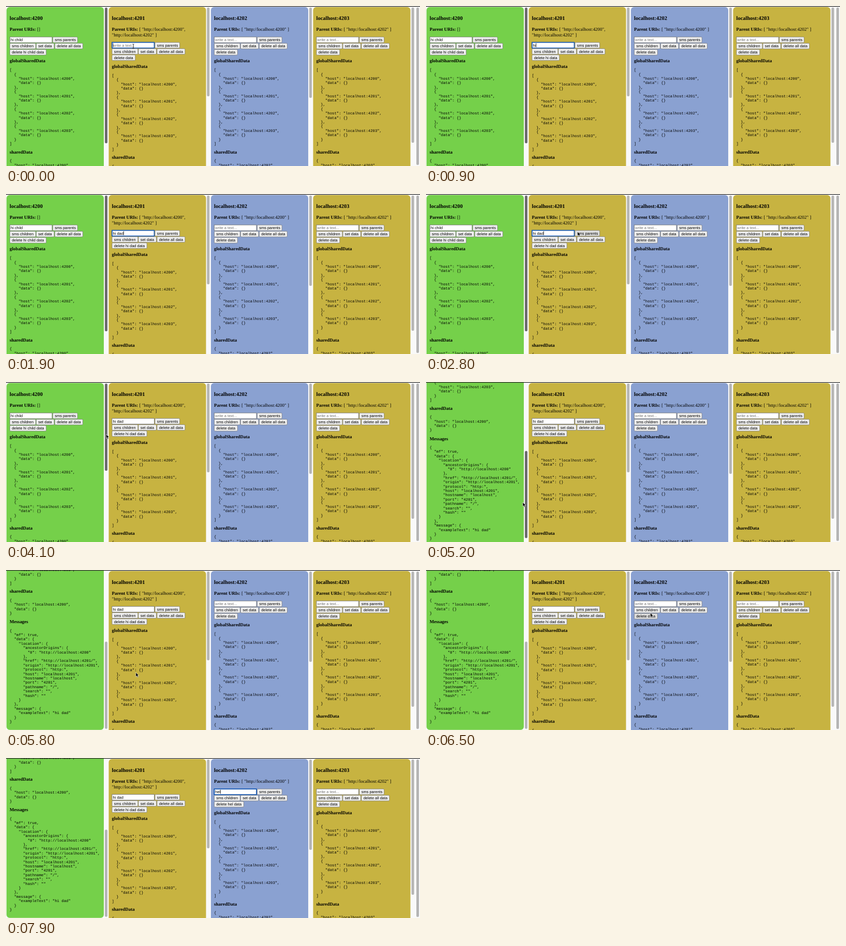
An HTML page that plays this animation: 800x310 px, repeating every 8 s.

```html
<!DOCTYPE html>
<html lang="en">
<head>
<meta charset="utf-8">
<title>Shared data between frames</title>
<style>
  html, body { margin: 0; width: 100%; height: 100%; overflow: hidden; background: #f9f9f9; }
  svg { display: block; }
  text { white-space: pre; text-rendering: geometricPrecision; }
  .title, .bold, .serif { font-family: "Liberation Serif", Times, serif; font-size: 8.96px; }
  .title { font-size: 10.48px; }
  .title, .bold { font-weight: bold; }
  .code { font-family: "Liberation Mono", Courier, monospace; font-size: 7.28px; }
  .ui { font-family: "Liberation Sans", Arial, sans-serif; font-size: 7.47px; }
  .button { fill: #efefef; stroke: #707070; stroke-width: .7px; }
  .button.hover { fill: #dedede; }
  .field { fill: #fff; stroke: #767676; stroke-width: .9px; }
  .field.focus { stroke: #1257b5; stroke-width: 1.7px; }
  .empty { fill: #757575; }
</style>
</head>
<body>
<svg id="stage" width="800" height="310" viewBox="0 0 800 310"></svg>
<script>
const LOOP = 8000, STEP = 100;
const LINE = 8.4, CHAR = 4.368;
const stage = document.getElementById('stage');

function add(parent, tag, attrs, content) {
  const node = document.createElementNS('http://www.w3.org/2000/svg', tag);
  for (const key in attrs) node.setAttribute(key, attrs[key]);
  if (content !== undefined) node.textContent = content;
  return parent.appendChild(node);
}

const label = (parent, cls, x, y, content) => add(parent, 'text', { class: cls, x, y }, content);

function json(parent, x, y, value) {
  JSON.stringify(value, null, 2).split('\n').forEach((line, i) => {
    const body = line.trimStart();
    label(parent, 'code', x + (line.length - body.length) * CHAR, y + i * LINE, body);
  });
}

function button(parent, x, y, width, content) {
  const box = add(parent, 'rect', { class: 'button', x: x + .4, y: y + .4, width, height: 10.8, rx: 1.6 });
  const text = label(parent, 'ui', x + 4.2, y + 8.5, content);
  return { box, text };
}

const hosts = ['4200', '4201', '4202', '4203'].map(port => 'localhost:' + port);

function panel(index, color, height, uris, shift) {
  const x = 1 + 197.5 * index, left = x + 6;
  const g = add(stage, 'g', {});
  add(g, 'rect', { x, y: 2, width: 188, height, rx: 6, fill: color });
  label(g, 'title', left, 26.8, hosts[index]);
  const line = label(g, 'serif', left, 48.2);
  add(line, 'tspan', { class: 'bold' }, 'Parent URIs:');
  add(line, 'tspan', {}, ' ' + uris[0]);
  if (uris[1]) label(g, 'serif', left, 59, uris[1]);

  const body = add(g, 'g', { transform: `translate(0 ${shift})` });
  const field = add(body, 'rect', { class: 'field', x: left + .4, y: 60, width: 81.6, height: 11 });
  const text = label(body, 'ui', left + 2, 68.2);
  const caret = add(body, 'rect', { y: 61.6, width: .7, height: 7.8 });
  const sms = button(body, left + 83, 59.7, 47.8, 'sms parents');
  button(body, left, 71.8, 50, 'sms children');
  button(body, left + 51, 71.8, 34.6, 'set data');
  button(body, left + 87, 71.8, 54, 'delete all data');
  const del = button(body, left, 83.8, 45, 'delete data');

  label(body, 'bold', left, 109, 'globalSharedData');
  json(body, left, 126.2, hosts.map(host => ({ host, data: {} })));
  label(body, 'bold', left, 285.7, 'sharedData');
  json(body, left, 302.2, { host: hosts[index], data: {} });
  return { g, left, field, text, caret, sms, del };
}

const gold = '#c7b341';
const panels = [
  panel(0, '#75d04a', 549, ['[]'], 0),
  panel(1, gold, 400, ['[ "http://localhost:4200",', '"http://localhost:4202" ]'], 10.5),
  panel(2, '#8aa1d1', 400, ['[ "http://localhost:4200" ]'], 0),
  panel(3, gold, 400, ['[ "http://localhost:4202" ]'], 0)
];

const inbox = add(panels[0].g, 'g', {});
label(inbox, 'bold', 7, 344.7, 'Messages');
json(inbox, 7, 361, {
  mf: true,
  data: {
    location: {
      ancestorOrigins: { 0: 'http://localhost:4200' },
      href: 'http://localhost:4201/',
      origin: 'http://localhost:4201',
      protocol: 'http:',
      host: 'localhost:4201',
      hostname: 'localhost',
      port: '4201',
      pathname: '/',
      search: '',
      hash: ''
    }
  },
  message: { exampleText: 'hi dad' }
});

const bar = (x, height) => add(stage, 'rect', { x, y: 3, width: 5, height, rx: 2.5, fill: '#b5b5b5' });
const thumb = bar(191, 263);
bar(388.3, 172);
bar(586, 175);
bar(783.6, 262);
bar(793, 305);
add(stage, 'rect', { width: 800, height: 1.3, fill: '#303030' });

const arrow = add(stage, 'path', {
  d: 'M0 0V8.2L1.9 6.5L3.2 9.4L4.6 8.8L3.3 6H5.8Z',
  fill: '#000', stroke: '#fff', 'stroke-width': .6
});
const beam = add(stage, 'path', {
  d: 'M-1.6-4.2Q0-4.2 0-3.2Q0-4.2 1.6-4.2M0-3.2V3.2M-1.6 4.2Q0 4.2 0 3.2Q0 4.2 1.6 4.2',
  fill: 'none', stroke: '#111', 'stroke-width': .9
});

// Eased interpolation through [time, ...values] stops.
function follow(stops, t) {
  let i = 0;
  while (i < stops.length - 2 && t >= stops[i + 1][0]) i++;
  const [t0, ...a] = stops[i], [t1, ...b] = stops[i + 1];
  const p = Math.min(1, Math.max(0, (t - t0) / (t1 - t0)));
  const e = p * p * (3 - 2 * p);
  return a.map((v, k) => v + (b[k] - v) * e);
}

const SEND = 3100;
const pointerPath = [
  [0, 246, 78], [2200, 246, 78], [2700, 293, 73], [3300, 293, 73], [4000, 193.5, 101],
  [4300, 193.5, 101], [5200, 187, 233], [5500, 187, 239], [6400, 433.5, 83],
  [6600, 433.5, 83], [6900, 430, 66], [8000, 430, 66]
];
const scrollPath = [[4300, 0], [5200, 232], [5400, 241.3]];
const typing = [
  { panel: panels[0], word: 'hi child', keys: [], focus: [-1, -1] },
  { panel: panels[1], word: 'hi dad', keys: [700, 800, 1100, 1300, 1500, 1700], focus: [0, SEND] },
  { panel: panels[2], word: 'hel', keys: [7400, 7600, 7800], focus: [7000, LOOP] },
  { panel: panels[3], word: '', keys: [], focus: [-1, -1] }
];

function drawField({ panel: p, word, keys, focus }, t) {
  const pressed = keys.filter(k => k <= t);
  const value = keys.length ? word.slice(0, pressed.length) : word;
  const focused = t >= focus[0] && t < focus[1];
  const since = t - (pressed.length ? pressed[pressed.length - 1] : focus[0]);
  p.field.classList.toggle('focus', focused);
  p.text.textContent = value || 'write a text...';
  p.text.classList.toggle('empty', !value);
  p.caret.setAttribute('x', p.left + 2.2 + (value ? p.text.getComputedTextLength() : 0));
  p.caret.setAttribute('visibility', focused && since % 1000 < 500 ? 'visible' : 'hidden');
  p.del.text.textContent = ['delete', value.trim(), 'data'].filter(Boolean).join(' ');
  p.del.box.setAttribute('width', p.del.text.getComputedTextLength() + 8);
}

function drawPointer(t) {
  const [x, y] = follow(pointerPath, t);
  const hidden = (t >= 700 && t < 2200) || t >= 7400;
  const overField = t < 2700 ? x < 287 : t >= 6600 && y < 72;
  arrow.setAttribute('transform', `translate(${x} ${y})`);
  beam.setAttribute('transform', `translate(${x} ${y})`);
  arrow.setAttribute('visibility', hidden || overField ? 'hidden' : 'visible');
  beam.setAttribute('visibility', !hidden && overField ? 'visible' : 'hidden');
  panels[1].sms.box.classList.toggle('hover', t >= 2500 && t < 3500 && x > 287);
  panels[2].del.box.classList.toggle('hover', t >= 6100 && t < 6800 && x > 402 && y > 83 - 1 && y < 95);
}

function draw(t) {
  const [scroll] = follow(scrollPath, t);
  const sent = t >= SEND;
  panels[0].g.setAttribute('transform', `translate(0 ${-scroll})`);
  inbox.setAttribute('visibility', sent ? 'visible' : 'hidden');
  thumb.setAttribute('y', 3 + scroll * .563);
  thumb.setAttribute('height', sent ? 169 : 263);
  thumb.setAttribute('fill', t < 5700 ? '#6c6c6c' : '#b5b5b5');
  typing.forEach(item => drawField(item, t));
  drawPointer(t);
}

function tick(now) {
  draw(Math.floor(now % LOOP / STEP) * STEP);
  requestAnimationFrame(tick);
}
draw(0);
requestAnimationFrame(tick);
</script>
</body>
</html>
```
